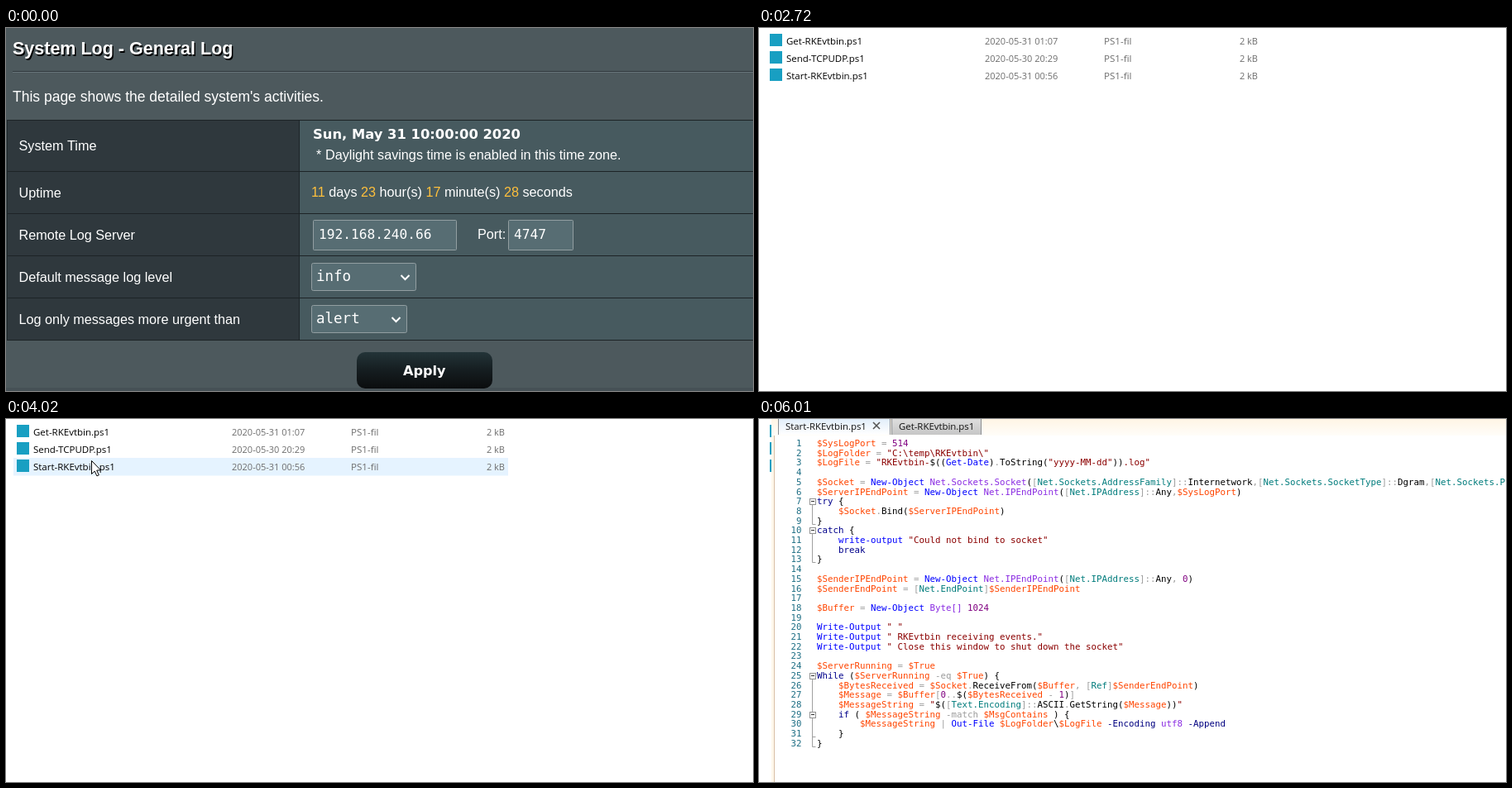
Write an HTML page with a canvas that moves like this. It is 903 px wide and 439 px high and loops after 8000 ms.

```html
<!DOCTYPE html>
<html lang="en">
<head>
<meta charset="utf-8">
<title>Log settings</title>
<style>
  html, body { margin: 0; width: 100%; height: 100%; overflow: hidden; background: #fff; }
  canvas { display: block; }
</style>
</head>
<body>
<canvas id="stage" width="903" height="439"></canvas>
<script>
const W = 903, H = 439, LOOP = 8000;
const EXPLORER_AT = 2720, EDITOR_AT = 6010;
const ctx = document.getElementById('stage').getContext('2d');

const SANS = '"Liberation Sans", Arial, sans-serif';
const WIDE = '"DejaVu Sans", Verdana, sans-serif';
const MONO = '"DejaVu Sans Mono", monospace';
const UI = '"Open Sans", "Noto Sans", sans-serif';

function rect(x, y, w, h, color) {
  ctx.fillStyle = color;
  ctx.fillRect(x, y, w, h);
}

// Draws text and returns the x where it ends.
function text(str, x, y, font, color = '#fff', align = 'left') {
  ctx.font = font;
  ctx.fillStyle = color;
  ctx.textAlign = align;
  ctx.fillText(str, x, y);
  return x + ctx.measureText(str).width;
}

function line(points, color, width = 1) {
  ctx.beginPath();
  points.forEach(([x, y]) => ctx.lineTo(x, y));
  ctx.strokeStyle = color;
  ctx.lineWidth = width;
  ctx.stroke();
}

// Vertical gradient with evenly spaced colours.
function fade(y0, y1, ...colors) {
  const shade = ctx.createLinearGradient(0, y0, 0, y1);
  colors.forEach((c, i) => shade.addColorStop(i / (colors.length - 1), c));
  return shade;
}

function field(x, y, w, h, radius) {
  ctx.beginPath();
  ctx.roundRect(x + 0.5, y + 0.5, w - 1, h - 1, radius);
  ctx.fillStyle = '#576d73';
  ctx.fill();
  ctx.strokeStyle = '#929ea1';
  ctx.lineWidth = 1;
  ctx.stroke();
}

function select(label, y, w) {
  field(369, y, w, 34, 2);
  text(label, 375, y + 22, `17.5px ${MONO}`);
  const cx = 369 + w - 13.5, cy = y + 17;
  line([[cx - 5, cy - 2], [cx, cy + 3], [cx + 5, cy - 2]], '#fff', 2);
}

function applyButton() {
  ctx.beginPath();
  ctx.roundRect(424, 392, 164, 44, 10);
  ctx.fillStyle = fade(392, 436, '#233438', '#151d20', '#0b0d0e');
  ctx.fill();
  text('Apply', 480, 420, `bold 16.1px ${WIDE}`);
}

function drawSettings(t) {
  const ticks = Math.min(3, Math.floor((t + 680) / 1000));
  const body = `16.22px ${SANS}`;
  rect(0, 0, W, H, '#4d595d');
  rect(0, 435, W, 4, '#465156');

  const title = 'System Log - General Log';
  text(title, 9.5, 33.5, `bold 21.5px ${SANS}`, '#000');
  text(title, 8, 32, `bold 21.5px ${SANS}`);
  rect(8, 52, W - 8, 1, '#30393d');
  rect(8, 53, W - 8, 1, '#68757a');
  text("This page shows the detailed system's activities.", 8, 89, `17.5px ${SANS}`);

  rect(1, 111, 354, 267, '#2f383d');
  rect(355, 111, W - 355, 267, '#475a5f');
  for (const y of [111, 173, 224, 275, 326, 377]) rect(1, y, W - 1, 1, '#1d2326');
  for (const x of [1, 354]) rect(x, 111, 1, 267, '#1d2326');

  const labels = ['System Time', 'Uptime', 'Remote Log Server',
    'Default message log level', 'Log only messages more urgent than'];
  labels.forEach((label, i) => text(label, 15.5, i ? 154 + 51 * i : 148, body));

  text(`Sun, May 31 10:00:0${ticks} 2020`, 371, 134, `bold 16.35px ${WIDE}`);
  text('*', 375, 159, body);
  text('Daylight savings time is enabled in this time zone.', 386, 159, body);

  const uptime = ['11', ' days ', '23', ' hour(s) ', '17', ' minute(s) ', `${28 + ticks}`, ' seconds'];
  uptime.reduce((x, part, i) => text(part, x, 204, body, i % 2 ? '#fff' : '#ffc03c'), 369);

  field(371, 232, 174, 37, 1);
  text('192.168.240.66', 378, 255, `16.2px ${MONO}`);
  text('Port:', 570, 255, body);
  field(607, 232, 79, 37, 1);
  text('4747', 614, 255, `16.2px ${MONO}`);
  select('info', 284, 127);
  select('alert', 335, 116);
  applyButton();

  if (t >= 2650) {
    ctx.beginPath();
    ctx.arc(819, 452, 17, 0, 7);
    ctx.fillStyle = '#a5a62b';
    ctx.fill();
  }
}

const FILES = [
  ['Get-RKEvtbin.ps1', '2020-05-31 01:07'],
  ['Send-TCPUDP.ps1', '2020-05-30 20:29'],
  ['Start-RKEvtbin.ps1', '2020-05-31 00:56']
];

function drawExplorer(pointer) {
  const gray = '#6d6d6d';
  rect(0, 0, W, H, '#fff');
  FILES.forEach(([name, date], i) => {
    const top = 5 + 21 * i, base = top + 15;
    const hover = pointer && pointer.x >= 9 && pointer.x < 607 &&
      pointer.y >= top && pointer.y < top + 21;
    if (hover) rect(9, top, 598, 21.5, '#e5f3ff');
    rect(13, top + 2, 15, 15, '#189fc2');
    text(name, 33, base, `11.5px ${UI}`, '#000');
    text(date, 273, base, `11px ${UI}`, gray);
    text('PS1-fil', 417, base, `11.6px ${UI}`, gray);
    text('2 kB', 603, base, `11px ${UI}`, gray, 'right');
  });
}

const CODE = String.raw`$SysLogPort = 514
$LogFolder = "C:\temp\RKEvtbin\"
$LogFile = "RKEvtbin-$((Get-Date).ToString("yyyy-MM-dd")).log"

$Socket = New-Object Net.Sockets.Socket([Net.Sockets.AddressFamily]::Internetwork,[Net.Sockets.SocketType]::Dgram,[Net.Sockets.P
$ServerIPEndPoint = New-Object Net.IPEndPoint([Net.IPAddress]::Any,$SysLogPort)
try {
    $Socket.Bind($ServerIPEndPoint)
}
catch {
    write-output "Could not bind to socket"
    break
}

$SenderIPEndPoint = New-Object Net.IPEndPoint([Net.IPAddress]::Any, 0)
$SenderEndPoint = [Net.EndPoint]$SenderIPEndPoint

$Buffer = New-Object Byte[] 1024

Write-Output " "
Write-Output " RKEvtbin receiving events."
Write-Output " Close this window to shut down the socket"

$ServerRunning = $True
While ($ServerRunning -eq $True) {
    $BytesReceived = $Socket.ReceiveFrom($Buffer, [Ref]$SenderEndPoint)
    $Message = $Buffer[0..$($BytesReceived - 1)]
    $MessageString = "$([Text.Encoding]::ASCII.GetString($Message))"
    if ( $MessageString -match $MsgContains ) {
        $MessageString | Out-File $LogFolder\$LogFile -Encoding utf8 -Append
    }
}`.split('\n');

// Pattern and colour per kind of token, in order of priority.
const SYNTAX = [
  [/"[^"$]*"?|\.log"/, '#8b0000'],
  [/\$\w+/, '#ff4500'],
  [/(?:New-Object|Write-Output|Out-File|Get-Date)/, '#0000ff'],
  [/(?<=New-Object )[\w.]+(?:\[\])?|utf8/, '#8a2be2'],
  [/(?<=\[)[A-Z][\w.]+(?=\]|$)/, '#007c7c'],
  [/\b(?:try|catch|break|while|if)\b/, '#00008b'],
  [/-(?:Encoding|Append)/, '#000080'],
  [/-eq|-match|::|\.\.|[=|,.\[\]-]/, '#9c9c9c'],
  [/\b\d+\b/, '#800080'],
  [/\w+|[(){}$\\]/, '#000']
];
const LEXER = new RegExp(SYNTAX.map(([re]) => `(${re.source})`).join('|'), 'gi');
const TOKENS = CODE.map(row => [...row.matchAll(LEXER)].map(m => ({
  str: m[0],
  col: m.index,
  color: SYNTAX[m.slice(1).findIndex(g => g !== undefined)][1]
})));

const rowY = n => Math.round(29 + 11.7 * (n - 1));

function fold(first, last) {
  const y = rowY(first) + 0.5, end = rowY(last) + 4.5;
  line([[64.5, y + 4], [64.5, end], [68.5, end]], '#a0a0a0');
  rect(61, y - 3.5, 8, 8, '#fff');
  ctx.strokeStyle = '#929292';
  ctx.strokeRect(61.5, y - 3, 7, 7);
  rect(63, y - 0.5, 4, 1, '#333');
}

function tab(label, x, w, shade) {
  rect(x, 0, w, 19, shade);
  line([[x + 0.5, 0], [x + 0.5, 19]], '#8b8e92');
  line([[x + w - 0.5, 0], [x + w - 0.5, 19]], '#8b8e92');
  text(label, x + 9, 13, `11.4px ${UI}`, '#111');
}

function drawEditor() {
  rect(15, 0, W - 15, H, '#fff7ea');
  rect(15, 0, W - 15, 20, fade(0, 20, '#fff5e5', '#fffdf9'));
  rect(18, 20, W - 18, H - 20, '#fff');
  rect(18, 20, 1, H - 20, '#d8bfa6');
  tab('Start-RKEvtbin.ps1', 23, 136, fade(0, 19, '#e2eefa', '#fff'));
  tab('Get-RKEvtbin.ps1', 160, 109, fade(0, 19, '#dedede', '#c6c6c6'));
  line([[138, 4], [146, 12]], '#555', 1.6);
  line([[146, 4], [138, 12]], '#555', 1.6);

  const font = `10.8px ${MONO}`;
  TOKENS.forEach((tokens, i) => {
    const base = rowY(i + 1) + 4;
    text(i + 1, 51.5, base, font, '#1f6f85', 'right');
    for (const { str, col, color } of tokens) text(str, 70 + col * 6.5, base, font, color);
  });
  [[7, 9], [10, 13], [25, 32], [29, 31]].forEach(([a, b]) => fold(a, b));
}

// Pointer keys: time, x, y.
const PATHS = [
  [[210, 475, 428], [450, 630, 374], [700, 767, 346], [990, 728, 331], [1140, 730, 333],
   [1230, 733, 340], [1500, 752, 385], [1790, 766, 440]],
  [[2720, 815, 440], [2950, 560, 300], [3200, 160, 160], [3410, 12, 116], [3490, 3, 108],
   [3570, 38, 72], [3640, 64, 49], [3790, 78, 45], [3870, 88, 48], [4210, 122, 52],
   [4450, 125, 53], [4530, 140, 45], [4680, 230, 88], [4950, 490, 260], [5240, 657, 386],
   [5470, 744, 440]]
];
const STEP = 75;

function pointerAt(t) {
  for (const path of PATHS) {
    const i = path.findLastIndex(key => key[0] <= t);
    if (i < 0 || i === path.length - 1) continue;
    const [t0, x0, y0] = path[i], [t1, x1, y1] = path[i + 1];
    const k = Math.floor((t - t0) / STEP) * STEP / (t1 - t0);
    return { x: Math.round(x0 + (x1 - x0) * k), y: Math.round(y0 + (y1 - y0) * k) };
  }
  return null;
}

function drawPointer({ x, y }) {
  const shape = [[0, 0], [0, 16], [3.7, 12.6], [6.4, 18.4], [8.8, 17.3], [6.2, 11.6], [11, 11.4]];
  ctx.beginPath();
  shape.forEach(([dx, dy]) => ctx.lineTo(x + dx + 0.5, y + dy + 0.5));
  ctx.closePath();
  ctx.fillStyle = '#fff';
  ctx.fill();
  ctx.strokeStyle = '#000';
  ctx.lineWidth = 1;
  ctx.stroke();
}

function render(t) {
  const pointer = pointerAt(t);
  if (t < EXPLORER_AT) drawSettings(t);
  else drawExplorer(pointer);
  if (t >= EDITOR_AT) drawEditor();
  if (pointer) drawPointer(pointer);
}

const start = performance.now();
function frame() {
  render((performance.now() - start) % LOOP);
  requestAnimationFrame(frame);
}
frame();
</script>
</body>
</html>
```
